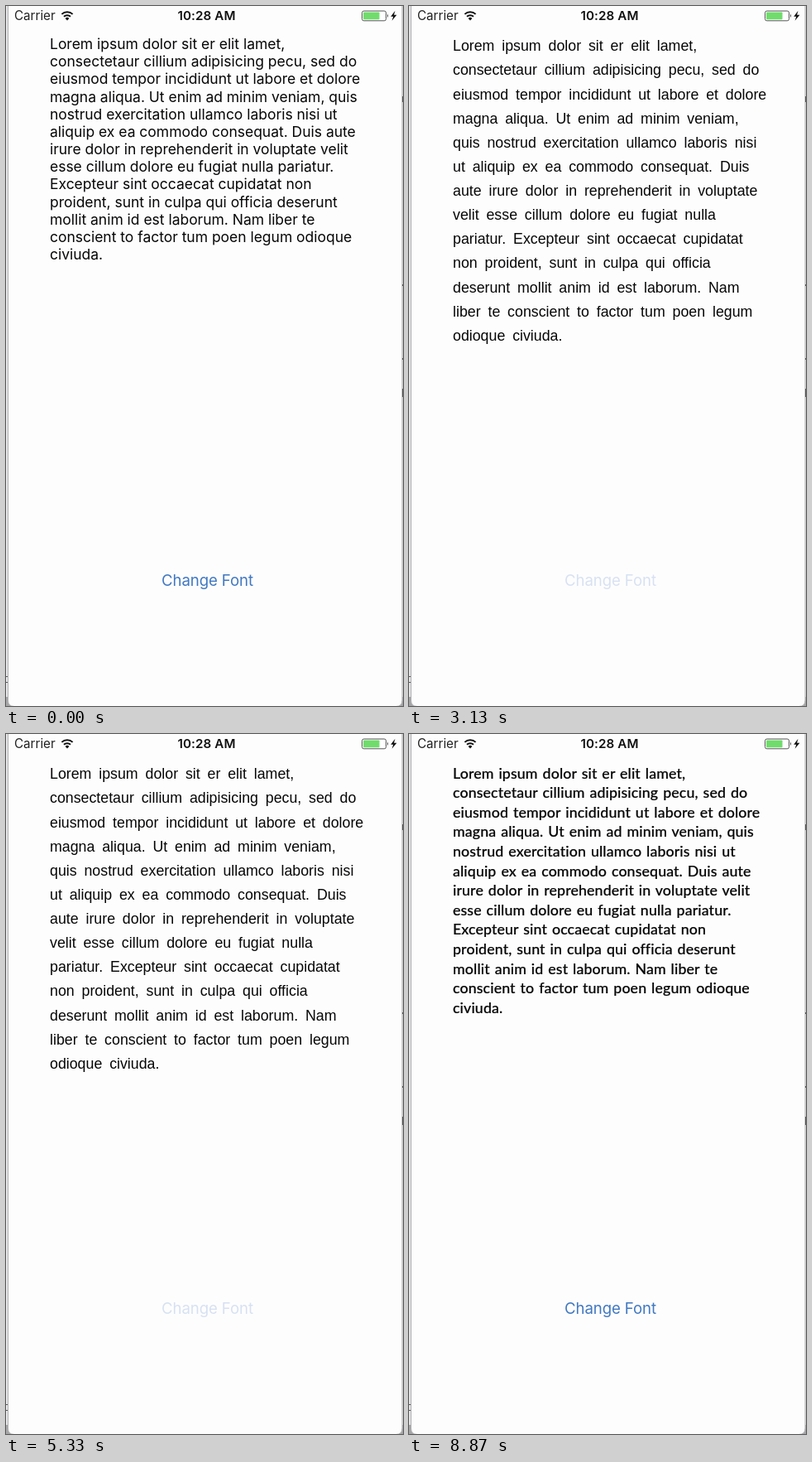
An HTML page that plays this animation: 480 px wide and 845 px high, repeating every 8990 ms.

```html
<!DOCTYPE html>
<html lang="en">
<head>
<meta charset="utf-8">
<style>
  html, body { margin: 0; width: 100%; height: 100%; overflow: hidden; background: #fff; }
  svg { display: block; width: 480px; height: 845px; }
  text { font-family: Inter, Roboto, sans-serif; white-space: pre; }
</style>
</head>
<body>
<svg viewBox="0 0 480 845">
  <rect width="480" height="845" fill="#e4e4e5"/>
  <path d="M0 834h12v11H0zM468 834h12v11h-12z" fill="#a5a5a7"/>
  <path d="M2.5 -2V838q0 7.5 7.5 7.5H471.5q7.5 0 7.5 -7.5V-2z" fill="#fefdfe" stroke="#b0b0b2"/>
  <path d="M479.5 109v7M479.5 462v10M479.5 336v2M479.5 425v2M0 809.5h2M0 816.5h2" stroke="#555"/>

  <text x="10" y="17.3" font-size="15.2" fill="#222">Carrier</text>
  <g fill="none" stroke="#111" stroke-width="2">
    <path d="M67.4 9.9a9.4 9.4 0 0 1 13.2 0M70 12.8a5.8 5.8 0 0 1 8 0"/>
    <path d="M74 17.4l-2.4-2.5a3.4 3.4 0 0 1 4.8 0z" fill="#111" stroke="none"/>
  </g>
  <text x="242.5" y="17.3" font-size="15.2" font-weight="600" letter-spacing=".1" text-anchor="middle" fill="#111">10:28 AM</text>
  <rect x="430.5" y="6" width="29" height="11.8" rx="2.2" fill="#fff" stroke="#555"/>
  <rect x="432" y="7.5" width="19.5" height="8.8" rx=".8" fill="#70dc6c"/>
  <path d="M461 9.8q2 2 0 4.2z" fill="#333"/>
  <path d="M470.4 5.8l-5.2 6.9h3l-1.6 5.1 5.8-7.1h-3.3z" fill="#111"/>

  <g id="copy" fill="#060607"></g>
  <text id="button" x="243.5" y="699.8" font-size="18.6" letter-spacing="-.1" text-anchor="middle" fill="#3f78c0">Change Font</text>
</svg>
<script>
const LOOP = 8990, HOLD = 120, FADE = 470;
const words = `Lorem ipsum dolor sit er elit lamet, consectetaur cillium adipisicing pecu, sed do
eiusmod tempor incididunt ut labore et dolore magna aliqua. Ut enim ad minim veniam, quis
nostrud exercitation ullamco laboris nisi ut aliquip ex ea commodo consequat. Duis aute
irure dolor in reprehenderit in voluptate velit esse cillum dolore eu fugiat nulla pariatur.
Excepteur sint occaecat cupidatat non proident, sunt in culpa qui officia deserunt
mollit anim id est laborum. Nam liber te conscient to factor tum poen legum odioque civiuda.`.split(/\s+/);

// counts: words on each line
const narrow = [7, 6, 7, 8, 6, 7, 7, 7, 5, 7, 8, 7, 1];
const arial = '"Liberation Sans", Arial, sans-serif';
const styles = {
  system: { counts: narrow, top: 52, pitch: 21.18,
    css: 'font: 17.5px Inter, Roboto, sans-serif; letter-spacing: -.02px' },
  geometric: { counts: narrow, top: 53.6, pitch: 23.6,
    css: 'font: 500 17.8px Lato, sans-serif; letter-spacing: .11px; word-spacing: 1.3px; stroke: #060607; stroke-width: .2px' },
  airy: { counts: [7, 6, 7, 7, 6, 7, 7, 7, 5, 7, 7, 8, 2], top: 54.3, pitch: 29.13,
    css: `font: 17.8px ${arial}; word-spacing: 3.9px` },
  plain: { counts: [8, 7, 8, 7, 8, 6, 6, 7, 7, 8, 9, 2], top: 51.3, pitch: 20.45,
    css: `font: 17.8px ${arial}` }
};

// each tap is timed by its release
const taps = [
  [850, 'geometric'], [2120, 'airy'], [3170, 'plain'], [4200, 'geometric'],
  [5310, 'airy'], [6280, 'plain'], [7270, 'geometric']
];

const copy = document.getElementById('copy');
const button = document.getElementById('button');

function layOut({ counts, top, pitch, css }) {
  let first = 0;
  return counts.map((n, i) => {
    const line = words.slice(first, first += n).join(' ');
    return `<text x="53" y="${top + i * pitch}" style='${css}'>${line}</text>`;
  }).join('');
}

function buttonAlpha(t) {
  let alpha = 1;
  for (const [up] of taps) {
    if (t < up - HOLD || t >= up + FADE) continue;
    const p = Math.max(0, (t - up) / FADE);
    alpha = 0.2 + 0.8 * p * p * (3 - 2 * p);
  }
  return alpha;
}

let shown;
function draw(t) {
  let name = 'system';
  for (const [up, next] of taps) if (t >= up) name = next;
  if (name !== shown) copy.innerHTML = layOut(styles[shown = name]);
  button.setAttribute('opacity', buttonAlpha(t));
}

const start = performance.now();
function tick() {
  draw((performance.now() - start) % LOOP);
  requestAnimationFrame(tick);
}
tick();
</script>
</body>
</html>
```
